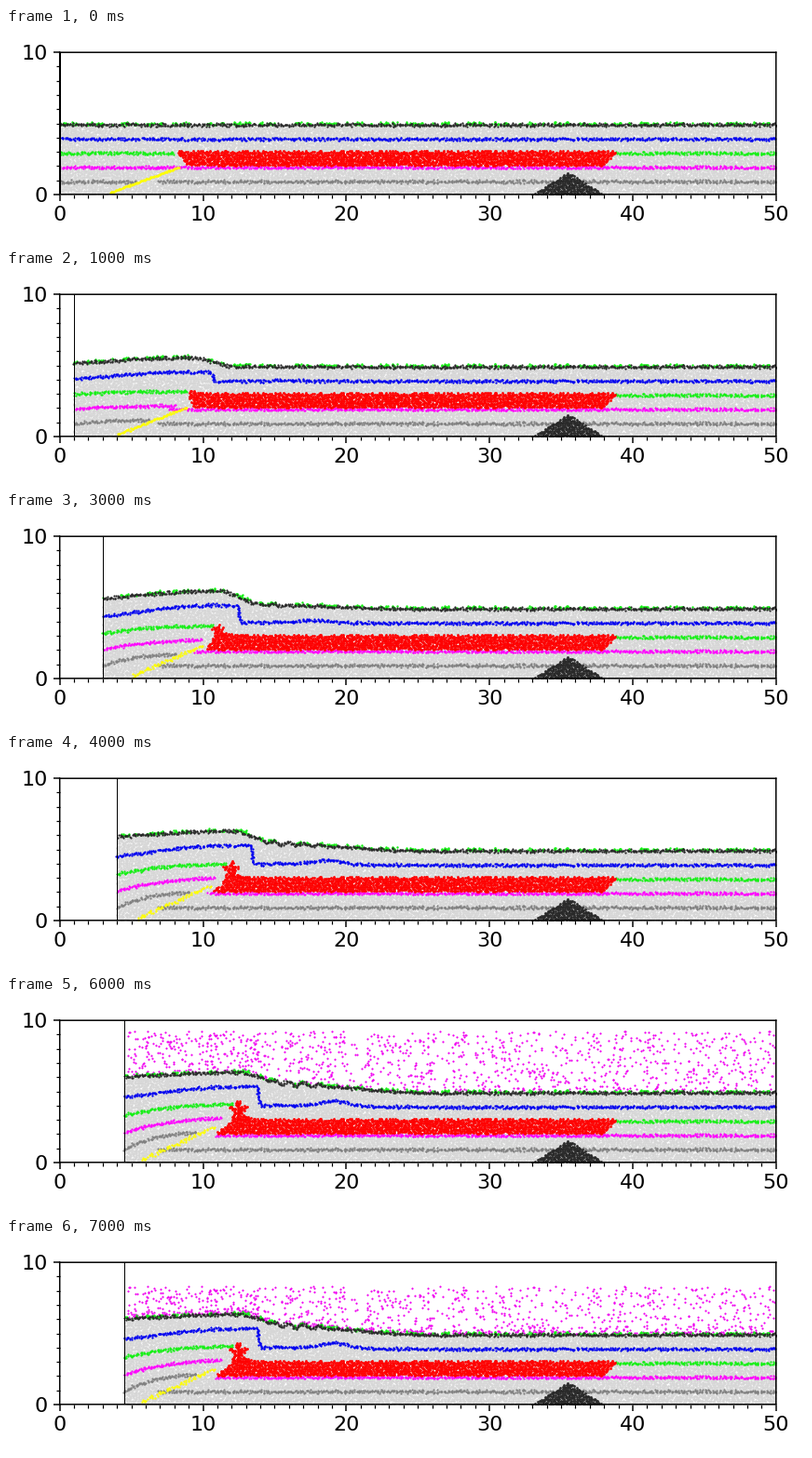
Write a matplotlib script that moves like this. It is 859 px wide and 230 px high and loops after 8000 ms.

```python
import numpy as np
import matplotlib.pyplot as plt
from matplotlib.animation import FuncAnimation

W, H, DPI = 859, 230, 128
FRAMES, INTERVAL = 8, 1000
WALL_END = 4.5
LEFT, RIGHT, TOP, BOTTOM = 57.7, 826.8, 26.2, 178.8
DARK, LIME, BLUE, PINK, GREY = "#282828", "#14f014", "#0000f0", "#ff00ff", "#808080"
GREY_H, PINK_H, LIME_H, BLUE_H, TOP_H = np.arange(5) + 0.9
RAIN = 1150


def px(n):
    """Pixels to points."""
    return n * 72 / DPI


def ease(t):
    t = np.clip(t, 0, 1)
    return t * t * (3 - 2 * t)


def bell(t):
    return np.exp(-t * t)


def crest(w):
    """Where the fold peaks once the wall has moved to w."""
    return 8.3 + 0.92 * w


def climb(x, h, w, end):
    """Height of a layer pushed up the ramp between the wall and end."""
    upper = h > 3
    high = 1.6 * (1 - np.exp(-w / 1.9)) if upper else 0.27 * w
    low = 0.25 * w * (h / TOP_H) ** 2
    s = np.clip((x - w) / (end - w), 0, 1)
    return h + low + (high - low) * np.sin(np.pi / 2 * s) ** (1.2 if upper else 0.8)


def fold(x, h, w, tail, start, width):
    """A climbing layer that falls back to its tail beyond the crest."""
    up, base = climb(x, h, w, crest(w)), h + tail
    return base + (up - base) * (1 - ease((x - crest(w) - start) / width))


def surface(x, w):
    d, slump = x - crest(w), 0.04 * w ** 2
    rough = 0.2 * slump * np.sin(6 * x) * bell((d - 4) / 1.8)
    return fold(x, TOP_H, w, slump * (1 - ease(d / 14)), 0, 3) + rough


def blue_layer(x, w):
    d, slump = x - crest(w), 0.04 * w ** 2
    tail = slump * (0.45 * bell((d - 6.7) / 1.4) + 0.15 * (1 - ease(d / 14)))
    return fold(x, BLUE_H, w, tail, 1.3, 0.3)


def in_salt(x, y, w):
    """Slab with slanted ends, a neck below the crest and a star on the neck."""
    c, up = crest(w), (y - 2) / 1.07
    foot, lip = 8.85 + 0.42 * w, 8.15 + 0.95 * w
    neck = 0.17 * w * np.exp(-np.abs(x - c) / 0.4)
    slab = (y > 2) & (y < 3.07 + neck) & (x < 38 + 0.9 * up)
    slab &= x > foot + (lip - foot) * np.minimum(up, 1) - neck * (up > 0.6)
    dx, dy = x - c, y - (2.9 + 0.17 * w)
    spikes = 0.7 + 0.3 * np.cos(5 * (np.arctan2(dy, dx) - np.pi / 2))
    return slab | (np.hypot(dx, dy) < 0.16 * w * spikes)


def in_cone(x, y):
    return y < 1.55 * (1 - np.abs(x - 35.5) / 2.5)


def make_grains(step=0.14):
    """Jittered hexagonal packing over the whole bed."""
    rng = np.random.default_rng(1)
    gx, gy = np.meshgrid(np.arange(0, 50, step), np.arange(0.03, 6.6, step * 0.87))
    gx[1::2] += step / 2
    pts = np.array([gx.ravel(), gy.ravel()])
    return pts + rng.normal(0, 0.025, pts.shape)


def row(curve, x0, x1, seed, step=0.055, spread=0.06):
    """Grains scattered along a curve, laid from its right end."""
    x = np.linspace(x1, x0, 1500)
    y = curve(x)
    arc = np.r_[0, np.cumsum(np.hypot(np.diff(x), np.diff(y)))]
    s = np.arange(0, arc[-1], step)
    jitter = np.random.default_rng(seed).normal(0, spread, (len(s), 2)).T
    pts = np.array([np.interp(s, arc, x), np.interp(s, arc, y)])
    return pts + np.clip(jitter, -0.11, 0.11)


def flat(h, x0, x1=50, seed=5):
    return row(lambda x: np.full_like(x, h), x0, x1, seed)


def ramp(h, w, end, seed):
    return row(lambda x: climb(x, h, w, end), w, end, seed)


def fault_row(w):
    x0, x1 = 3.5 + 0.48 * w, 8.3 + 0.55 * w
    y0, y1 = 0.12, 1.9 + 0.14 * w
    line = lambda x: y0 + (y1 - y0) * (x - x0) / (x1 - x0)
    return row(line, x0, x1, 50, 0.05 + 0.008 * w, 0.02 + 0.015 * w)


GRAINS = make_grains()
rng = np.random.default_rng(7)
rain_x = rng.uniform(WALL_END + 0.1, 49.95, RAIN)
rain_h = rng.uniform(0, 1, RAIN)
rest = np.abs(rng.normal(0, 0.17, RAIN)) + 0.05


def rain(fall):
    low = surface(rain_x, WALL_END) + 0.2
    y = low + rain_h * (9.55 - low) - fall
    return rain_x, np.maximum(y, low - 0.2 + rest)


fig = plt.figure(figsize=(W / DPI, H / DPI), dpi=DPI, facecolor="white")
ax = fig.add_axes([LEFT / W, 1 - BOTTOM / H, (RIGHT - LEFT) / W, (BOTTOM - TOP) / H])
ax.set(xlim=(0, 50), ylim=(0, 10), xticks=range(0, 51, 10), yticks=(0, 10))
ax.set_xticks(range(51), minor=True)
ax.set_yticks(range(11), minor=True)
ax.tick_params(length=px(7), width=px(1.5), pad=px(5), labelsize=px(22.2))
ax.tick_params(axis="y", pad=px(6))
ax.tick_params(which="minor", length=px(4.2), width=px(1.2))
for spine in ax.spines.values():
    spine.set(linewidth=px(1.5), snap=False)


def dots(color, size):
    return ax.plot([], [], "o", color=color, ms=px(size), mew=0)[0]


bed = dots("#d6d6d6", 2.6)
grey = dots(GREY, 2.2)
pink = dots(PINK, 2.2)
blue = dots(BLUE, 2.2)
lime = dots(LIME, 2.2)
salt = dots("#ff0000", 2.8)
cone = dots(DARK, 2.8)
fault = dots("#ffff00", 2.3)
drops = dots("#f000f0", 2.2)
grass = dots(LIME, 2.4)
crust = dots(DARK, 2.2)
wall, = ax.plot([], [], color="black", lw=px(1))
cone.set_data(GRAINS[:, in_cone(*GRAINS)])


def draw(i):
    w = min(i, WALL_END)
    c = crest(w)
    x, y = GRAINS
    bed.set_data(GRAINS[:, (x > w) & (y < surface(x, w))])
    salt.set_data(GRAINS[:, in_salt(x, y, w)])
    grey.set_data(np.hstack([ramp(GREY_H, w, c - 2.9, 10), flat(GREY_H, 6.9)]))
    pink.set_data(np.hstack([ramp(PINK_H, w, c - 1.2, 20), flat(PINK_H, c - 1.6)]))
    lime.set_data(np.hstack([ramp(LIME_H, w, c - 0.3, 40), flat(LIME_H, 38.8)]))
    blue.set_data(row(lambda t: blue_layer(t, w), w, 50, 30))
    fault.set_data(fault_row(w))
    crust.set_data(row(lambda t: surface(t, w), w, 50, 60))
    tx, ty = row(lambda t: surface(t, w) + 0.08, w, 50, 70)
    clump = np.sin(3.1 * tx) + np.sin(7.3 * tx) > 0
    grass.set_data(tx[clump], ty[clump])
    # Drops start at rest and speed up
    drops.set_data(rain(0.31 * (i - 5) ** 2) if i >= 5 else ([], []))
    wall.set_data([w, w], [0, 10])
    return bed, grey, pink, blue, lime, salt, cone, fault, drops, grass, crust, wall


anim = FuncAnimation(fig, draw, frames=FRAMES, interval=INTERVAL,
                     repeat=True, repeat_delay=0, blit=False)
plt.show()
```
